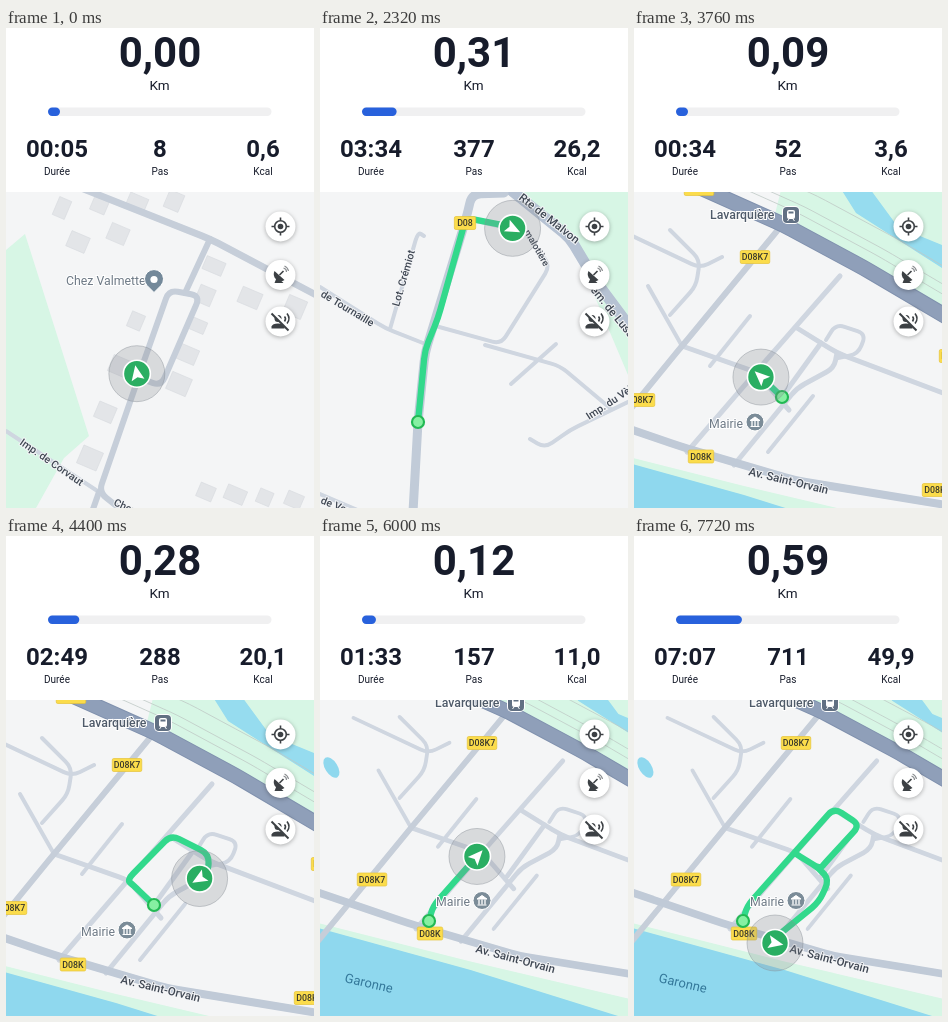
An HTML page for the animation above (8 s loop, 308x480 px).

```html
<!DOCTYPE html>
<html lang="fr">
<head>
<meta charset="utf-8">
<title>Suivi de marche</title>
<style>
  html, body { margin: 0; width: 100%; height: 100%; overflow: hidden; background: #fff; }
  svg { display: block; }
  #stage { width: 308px; height: 480px; }
  text { font-family: Roboto, Arial, sans-serif; }
  .stat { fill: #171c2b; text-anchor: middle; }
  .big { font-size: 42px; font-weight: 700; }
  .num { font-size: 24px; font-weight: 700; }
  .cap { font-size: 10px; }
  .road, .trail { fill: none; stroke-linecap: round; stroke-linejoin: round; }
  .trail { stroke: #32d98c; stroke-width: 6.3px; }
  .street { font-weight: 500; fill: #3f4753; paint-order: stroke; stroke: #f4f5f7; stroke-width: 2px; }
  .place { font-size: 12.3px; fill: #6d7985; paint-order: stroke; stroke: #fff; stroke-width: 2px; }
  .stop { font-weight: 500; fill: #4e5a69; }
  .fab { fill: #fff; stroke: none; filter: drop-shadow(0 1px 2px rgba(0, 0, 0, .3)); }
  .solid { fill: #3c4044; stroke: none; }
  .scene { visibility: hidden; }
</style>
</head>
<body>
<svg id="stage" viewBox="0 0 308 480">
  <rect width="308" height="480" fill="#fff"/>
  <text id="km" class="stat big" x="154" y="38.500"></text>
  <text class="stat" x="153.500" y="62" font-size="13.500">Km</text>
  <rect x="42" y="79.500" width="223.500" height="8.500" rx="4.200" fill="#f0f0f1"/>
  <rect id="bar" x="42" y="79.500" height="8.500" rx="4.200" fill="#2861dc"/>
  <text id="time" class="stat num" x="51" y="129"></text>
  <text id="paces" class="stat num" x="154" y="129"></text>
  <text id="kcal" class="stat num" x="257" y="129"></text>
  <text class="stat cap" x="51" y="147">Durée</text>
  <text class="stat cap" x="154" y="147">Pas</text>
  <text class="stat cap" x="257" y="147">Kcal</text>

  <svg id="map" y="164" width="308" height="316" viewBox="0 164 308 316"></svg>

  <g fill="none" stroke="#3c4044" stroke-width="1.600">
    <g transform="translate(274.500 198.500)">
      <circle class="fab" r="15"/>
      <circle r="5.800"/><circle r="2.800" class="solid"/>
      <path d="M0-9v3M0 9V6M-9 0h3M9 0H6"/>
    </g>
    <g transform="translate(274.500 247)">
      <circle class="fab" r="15"/>
      <path class="solid" d="M-6-4A7 7 0 0 0 4 5ZM-4 3L-6 8H3L0 5Z"/>
      <path d="M-1 0L3-4"/>
      <path d="M3-7A4 4 0 0 1 6-3M4-9A7 7 0 0 1 8-4" stroke="#8a8d90" stroke-width="1.200"/>
    </g>
    <g transform="translate(274.500 293.500)">
      <circle class="fab" r="15"/>
      <circle cx="-2.500" cy="-3" r="3.500" class="solid"/>
      <path class="solid" d="M-9 7V5Q-8 2-2.500 2T4 5V7Z"/>
      <path d="M4-5Q6-3 4 0M6.500-8Q10.500-3 6.500 2"/>
      <path d="M-8-9L9 8" stroke="#fff" stroke-width="3.500"/>
      <path d="M-9-8L8 9" stroke-width="1.900"/>
    </g>
  </g>
</svg>

<script>
const LOOP = 8000, STEP = 40, LEAD = 120, GOAL_KM = 2;
const $ = id => document.getElementById(id);
const parse = list => list.split(' ').map(p => p.split(',').map(Number));

// Path through a few key points, with rounded corners
function path(pts, radius = 9) {
  let d = 'M' + pts[0];
  for (let i = 1; i < pts.length - 1; i++) {
    const c = pts[i];
    const near = p => {
      const len = Math.hypot(p[0] - c[0], p[1] - c[1]);
      const f = Math.min(radius / len, .5);
      return [c[0] + (p[0] - c[0]) * f, c[1] + (p[1] - c[1]) * f];
    };
    d += `L${near(pts[i - 1])}Q${c} ${near(pts[i + 1])}`;
  }
  return d + 'L' + pts[pts.length - 1];
}

// Map parts
const area = (pts, fill) => `<polygon points="${pts}" fill="${fill}"/>`;
const roads = (width, color, ...lists) => lists.map(list =>
  `<path class="road" d="${path(parse(list))}" stroke="${color}" stroke-width="${width}"/>`).join('');
const street = (x, y, turn, str, size = 10.5) =>
  `<text class="street" font-size="${size}" transform="translate(${x} ${y}) rotate(${turn})">${str}</text>`;
const place = (x, y, str, kind = '') => `<text class="place ${kind}" x="${x}" y="${y}">${str}</text>`;
const shield = (x, y, str) => {
  const w = 9 + str.length * 4.1;
  return `<rect x="${x - w / 2}" y="${y - 6.5}" width="${w}" height="13" rx="1.5" fill="#fbdc4b" stroke="#e6c33a" stroke-width=".7"/>
    <text x="${x}" y="${y + 3.2}" text-anchor="middle" font-size="8.8" font-weight="500" fill="#3b3a2c">${str}</text>`;
};
const station = (x, y) => `<g transform="translate(${x} ${y})">
  <rect x="-9" y="-9" width="18" height="18" rx="5" fill="#fff"/>
  <rect x="-8" y="-8" width="16" height="16" rx="4" fill="#617083"/>
  <rect x="-4" y="-5" width="8" height="9" rx="2" fill="#fff"/>
  <path d="M-2.500-2.500h5" stroke="#617083" stroke-width="2"/>
  <path d="M-3.500 6l1.500-2M3.500 6l-1.500-2" stroke="#fff"/></g>`;
const townHall = (x, y) => `<g transform="translate(${x} ${y})">
  <circle r="9" fill="#7b8c98" stroke="#fff"/>
  <path d="M-5-1.500L0-5L5-1.500ZM-4.500 4.500h9" fill="#fff" stroke="#fff"/>
  <path d="M-3-1v5M0-1v5M3-1v5" stroke="#fff" stroke-width="1.300"/></g>`;
const pin = (x, y) => `<g transform="translate(${x} ${y})">
  <path d="M0 13L-7 6A9.500 9.500 0 1 1 7 6Z" fill="#74899a" stroke="#fff"/><circle r="3.600" fill="#fff"/></g>`;

let seed = 7;
const random = () => (seed = seed * 16807 % 2147483647) / 2147483647;

// A row of n houses between two points
function houses(x1, y1, x2, y2, n) {
  let out = '';
  for (let i = 0; i < n; i++) {
    const f = i / (n - 1), w = 13 + 9 * random(), h = 12 + 8 * random();
    out += `<rect x="${-w / 2}" y="${-h / 2}" width="${w}" height="${h}" fill="#e3e5e8" stroke="#d9dce0" stroke-width=".6"
      transform="translate(${x1 + (x2 - x1) * f} ${y1 + (y2 - y1) * f}) rotate(23)"/>`;
  }
  return out;
}

const GREEN = '#d7f6e5', WATER = '#8fd8ee', LANE = '#cfd6e0', ROAD = '#c6ced9';

const hamlet = area('0,222 19,206 83,408 58,430 30,480 0,480', GREEN)
  + houses(56, 180, 168, 173, 4) + houses(72, 214, 112, 206, 2) + houses(208, 238, 173, 356, 5)
  + houses(130, 293, 84, 430, 4) + houses(200, 464, 288, 472, 4) + houses(244, 270, 289, 279, 2)
  + roads(4, LANE, '0,403 93,464')
  + roads(7, ROAD, '70,158 204,211 312,268')
  + roads(6, ROAD, '204,211 179,265', '133,348 93,464 118,484', '93,464 86,484', '132,350 163,262 194,268 155,358 136,351');
const hamletText = place(60, 257, 'Chez Valmette') + pin(148, 251.5)
  + street(13, 416, 34.5, 'Imp. de Corvaut') + street(107, 477, 24, 'Chemin');

const crossing = area('195,164 308,164 308,347 250,210', GREEN)
  + roads(11, '#b6c2d3', '186,158 250,210 275,252 312,302')
  + roads(4, LANE, '0,259 65,300 108,317', '70,301 98,204 104,208', '112,297 181,316 230,238 205,204 147,191',
    '165,317 240,338 290,380', '236,316 191,356', '210,411 225,420 250,402 312,372', '0,466 42,484')
  + roads(9, '#c1cbd8', '93,484 98,394 105,325 146,191 152,166 184,165');
const crossingText = street(198, 171, 38, 'Rte de Malvon', 11.5) + street(270, 262, 51, 'em. de Luss', 11.5)
  + street(204, 204, 60, 'malotière', 9.5) + street(0, 268, 31, 'de Tournaille')
  + street(79, 279, -74, 'Lot. Crémiot') + street(269, 392, -33, 'Imp. du Vèl')
  + street(0, 475, 22, 'de Vor') + shield(145, 195, 'D08');

// Riverside town, shared by two walks
const trunk = '45,150 150,197 230,240 330,299';
const rails = [1, 1.5, 2.4].map(k =>
  `<g transform="translate(${14 * k} ${-12 * k})">${roads(.8, '#bfcac6', trunk)}</g>`).join('');
const town = area('150,150 330,150 330,300 140,190', GREEN)
  + area('200,150 228,150 264,199 330,226 330,254 222,185', '#96dcef') + rails
  + area('-60,415 110,458 330,510 330,530 -60,530', GREEN)
  + area('-60,420 110,467 330,536 330,620 -60,620', WATER)
  + `<ellipse rx="6.500" ry="12" fill="${WATER}" transform="translate(-35 255) rotate(-32)"/>`
  + roads(4, LANE, '-12,203 66,240 88,229', '36,202 66,232 62,258 36,287', '14,258 48,318', '116,288 76,338',
    '192,312 202,296 232,306 224,326 204,330', '179,368 134,424')
  + roads(5, LANE, '48,318 122,344 155,382', '206,248 122,344 53,424', '163,300 203,325 330,373',
    '203,325 200,340 163,360 100,437', '187,315 148,369')
  + roads(6, ROAD, '143,203 48,318 -50,438')
  + roads(8, '#c0cad7', '-60,382 45,418 160,452 330,480')
  + roads(16, '#7f90ad', trunk) + roads(14, '#8f9fb9', trunk);
const townText = place(76, 191, 'Lavarquière', 'stop') + station(157, 187)
  + shield(65, 161, 'D08K7') + shield(121, 229, 'D08K7') + shield(6, 372, 'D08K7')
  + shield(67, 428.5, 'D08K') + shield(301, 462, 'D08K') + shield(318, 328, 'D08K')
  + place(75, 400, 'Mairie') + townHall(121, 394) + street(114, 447, 13.5, 'Av. Saint-Orvain', 11.5);
const quayText = place(115, 171, 'Lavarquière', 'stop') + station(196, 167)
  + shield(162, 207, 'D08K7') + shield(52, 343.5, 'D08K7') + shield(110, 397.5, 'D08K')
  + place(116, 370, 'Mairie') + townHall(162, 364.5) + street(155, 416, 15, 'Av. Saint-Orvain', 11.5)
  + '<text transform="translate(24 446) rotate(13)" font-size="13" fill="#34789a">Garonne</text>';

// Keys: readings at a step, and the route point reached by then
const key = (step, sec, paces, kcal, km, point) => ({ step, sec, paces, kcal, km, point });
const first = point => key(0, 5, 8, .6, 0, point);
const scenes = [
  { from: 0, map: hamlet, text: hamletText,
    route: '133,351 130,346 136,318 163,264 193,267 156,358 130,350 131,340 139,310',
    keys: [first(1), key(20, 160, 268, 18.9, .22, 8)] },
  { from: 1400, map: crossing, text: crossingText,
    route: '98,394 105,322 118,290 146,190 193,199 228,236 184,315 117,298',
    keys: [first(0), key(20, 214, 377, 26.2, .31, 4), key(38, 402, 690, 48.6, .58, 7)] },
  { from: 3480, map: town, text: townText,
    route: '148,369 127,349 121,344 165,299 203,318 202,338 163,359 100,437',
    keys: [first(0), key(4, 34, 52, 3.6, .09, 1), key(36, 303, 524, 36.5, .47, 7)] },
  { from: 5440, map: `<g transform="translate(45 -12) scale(.96 .955)">${town}</g>`, text: quayText,
    route: '109,385 113,370 200,272 226,289 191,327 186,333 159,316 186,333 195,344 185,366 136,406 141,407',
    keys: [first(0), key(30, 244, 415, 29.1, .34, 4), key(54, 427, 711, 49.9, .59, 11)] }
];

$('map').innerHTML = '<rect y="164" width="308" height="316" fill="#f4f5f6"/>' + scenes.map(s => {
  s.pts = parse(s.route);
  const [x, y] = s.pts[0];
  return `<g class="scene">${s.map}<path class="trail"/>${s.text}
    <circle cx="${x}" cy="${y}" r="6" fill="#86f0a2" stroke="#22b954" stroke-width="2.200"/></g>`;
}).join('') + `<g id="walker">
  <circle r="28" fill="#7d838c" fill-opacity=".24" stroke="#8b9198" stroke-opacity=".45"/>
  <circle r="13.500" fill="#2aae62" stroke="#fff" stroke-width="1.600"/>
  <path id="arrow" d="M0-8.500L6.500 6.500L0 3.500L-6.500 6.500Z" fill="#fff"/></g>`;

// Distance walked at each key, measured on the trail itself
document.querySelectorAll('.scene').forEach((group, i) => {
  const s = scenes[i];
  s.group = group;
  s.trail = group.querySelector('.trail');
  s.keys.forEach(k => {
    s.trail.setAttribute('d', path(s.pts.slice(0, k.point + 1)));
    k.dist = k.point ? s.trail.getTotalLength() : 0;
  });
});

function sample(keys, step) {
  const i = Math.max(1, keys.findIndex(k => k.step >= step));
  const a = keys[i - 1], b = keys[i], f = (step - a.step) / (b.step - a.step);
  return name => a[name] + (b[name] - a[name]) * f;
}

const comma = (v, digits) => v.toFixed(digits).replace('.', ',');
const two = v => String(v).padStart(2, '0');

function draw(t) {
  const s = scenes.filter(c => c.from <= t).pop();
  const last = s.keys[s.keys.length - 1].step;
  const step = Math.min(last, Math.max(0, Math.floor((t - s.from - LEAD) / STEP)));
  const at = sample(s.keys, step);
  const sec = Math.round(at('sec')), d = at('dist');

  scenes.forEach(c => c.group.style.visibility = c === s ? 'visible' : 'hidden');
  $('km').textContent = comma(at('km'), 2);
  $('time').textContent = two(Math.floor(sec / 60)) + ':' + two(sec % 60);
  $('paces').textContent = Math.round(at('paces'));
  $('kcal').textContent = comma(at('kcal'), 1);
  $('bar').setAttribute('width', Math.max(12, 223.5 * at('km') / GOAL_KM));

  s.trail.style.strokeDasharray = d + ' 9999';
  s.trail.style.opacity = d > 0 ? 1 : 0;
  const p = s.trail.getPointAtLength(d);
  const a = s.trail.getPointAtLength(Math.max(0, d - 2.5));
  const b = s.trail.getPointAtLength(Math.max(2.5, d));
  const turn = Math.atan2(b.y - a.y, b.x - a.x) * 180 / Math.PI + 90;
  $('walker').setAttribute('transform', `translate(${p.x} ${p.y})`);
  $('arrow').setAttribute('transform', `rotate(${turn})`);
}

const start = performance.now();
function tick() {
  draw((performance.now() - start) % LOOP);
  requestAnimationFrame(tick);
}
tick();
</script>
</body>
</html>
```
